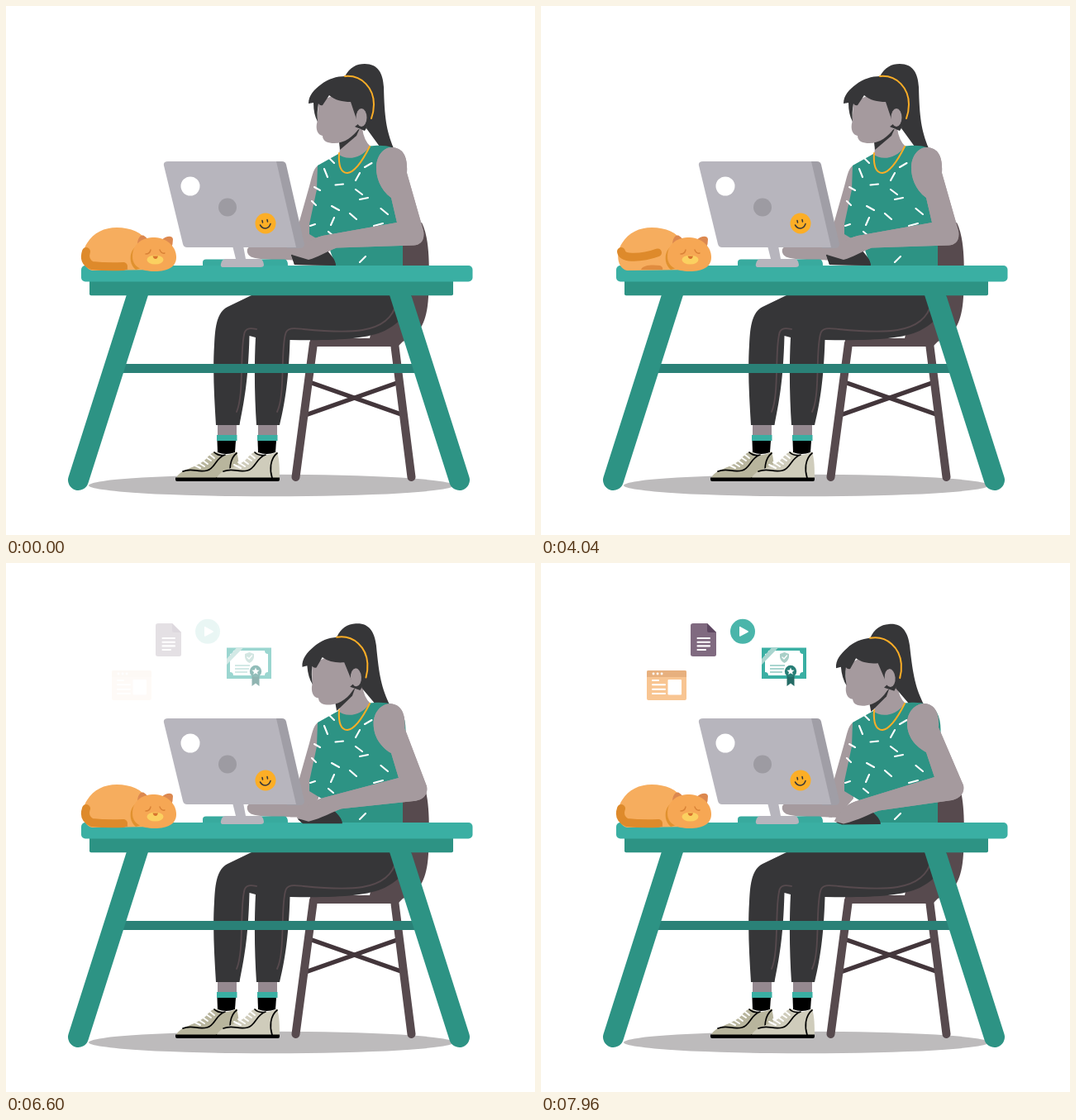
Write an HTML page that moves like this. It is 640 px wide and 640 px high and loops after 8000 ms.

```html
<!DOCTYPE html>
<html lang="en">
<head>
<meta charset="utf-8">
<title>Working at the desk</title>
<style>
  html, body { margin: 0; width: 100%; height: 100%; overflow: hidden; background: #fff; }
  svg { display: block; width: 100vw; height: 100vh; }
  .skin { fill: #a59a9e; }
  .dark { fill: #363638; }
  .teal { fill: #3aafa3; }
  .green { fill: #2d9384; }
  .chair { fill: #574a4e; }
  .line { fill: none; stroke-linecap: round; stroke-linejoin: round; }
  .white { stroke: #fff; stroke-width: 2.1; }
  .gold { stroke: #fcae26; stroke-width: 2; }
  .seam { stroke: #574a4e; stroke-width: 1.8; }
</style>
</head>
<body>
<svg viewBox="0 0 640 640">
  <defs>
    <g id="shoe">
      <path d="M255 571C260 560 279 559 290 549C297 541 301 537 306 541C313 545 322 543 328 539C331 550 331 560 331 571Z"/>
      <path d="M254 570.5H331V573Q331 575 329 575H256Q254 575 254 573Z" fill="#000"/>
      <path class="line" stroke="#000" stroke-width="1.7" d="M263 563C275 558 280 565 292 562C302 560 302 547 314 543M301 540Q306 545 314 543M328 541C319 548 319 562 322 571"/>
      <path class="line" stroke="#fff" stroke-width="2" d="M276 555L284 559M281 552L289 557M286 549L293 554M291 546L297 550M296 543L301 547"/>
    </g>
    <g id="ankle">
      <path fill="#958990" d="M305 506H328V521H305Z"/>
      <path class="teal" d="M304 519H328.500V526H304Z"/>
      <path d="M304.500 526H327L326 540Q315 544 305 540Z"/>
    </g>
  </defs>

  <ellipse cx="321" cy="580" rx="221" ry="13.300" fill="#bdbbbc"/>

  <!-- chair -->
  <path class="line" stroke="#43363b" stroke-width="5.500" d="M370 456L478 494M365 494L473 456"/>
  <path class="line" stroke="#574a4e" stroke-width="10" d="M372 408L350.500 570M470 408L490.500 570"/>
  <path class="chair" d="M470 262H503C512 280 513 312 511 352C509 386 499 399 480 406L474 412H368V402H440Z"/>

  <!-- legs -->
  <use href="#ankle" x="-49"/>
  <use href="#ankle"/>
  <use href="#shoe" x="-49" fill="#b8b59d"/>
  <use href="#shoe" fill="#cfccbb"/>
  <path class="dark" d="M310 345L297 350L268 364C255 371 253 388 252 410C250 440 252 475 254 507H282.500C288 478 293 455 294.500 399L302 401C300 440 301 475 303 507H331C338 478 342 450 343.500 404C400 405 436 403 458 393C478 383 488 370 492 345Z"/>
  <path class="line seam" d="M279 491C288 470 283 420 288 398C289 388 298 390 303 391M328 491C338 470 332 420 338 397C340 388 350 390 360 391C410 396 463 399 472 360"/>

  <!-- far arm and neck -->
  <path class="skin" d="M380 192C372 194 371 204 367 218L354 264L350 291H296C290 292 290 301 298 304C310 308 340 307 358 308L378 285Z"/>
  <path class="skin" d="M406 155L403 180L413 190L432 184L441 170Q433 163 431 148Z"/>

  <g id="head">
    <path class="dark" d="M410 85C416 74 424 70 434 70C450 70 456 81 457 98C458 135 460 150 469 172L452 170L436 148L441 120Z"/>
    <path class="dark" d="M403 165L428 148L424 157L404 174Z"/>
    <path class="skin" d="M378 116L376.500 140C374 149 377 156 383 157C383 164 390 166 397 166C410 166 420 158 427 148L431 120L410 102Z"/>
    <path class="dark" d="M366 118C366 108 373 101 381 95C390 88 400 85 410 85C431 84 445 100 445 120C445 130 441 140 434 151L422 146L427 142L424 137L417 116C407 116 398 114 391 108L383 120Q380 121 378 118Q376 128 377 140Q372 131 372 117Z"/>
    <ellipse class="skin" cx="430" cy="135" rx="6.500" ry="11"/>
    <path class="line gold" d="M410 85C431 83 445 100 445 119Q445 128 442 136"/>
  </g>

  <!-- torso -->
  <path class="green" d="M377 193L402 179C410 187 430 186 440 169.500C452 168 460 169 467 171C482 175 488 196 480 228V318H400L390 290L367 276V264L376 222Z"/>
  <path class="line white" d="M391 184L397 190M385 197L389 207M398.500 216.500L408 215.500M423 211L428 202M434 195L442.500 190M373 219L380 223M423 222L431 228M428 234L438 232M370 236L375 241M394 242L403 247M393 265L397 256M416 251L424 258M453.500 245L462 252M445 266L456 263M368 266L374 264M390 273L396 278M428 310L435 303"/>
  <path class="line gold" d="M403 178C402 193 405 202 413 202C423 201 433 184 440 170"/>

  <path class="dark" id="mouse"/>
  <path class="skin" id="arm"/>

  <!-- desk -->
  <path fill="#2a8177" d="M140 433H498V444H140Z"/>
  <path class="line" stroke="#2d9384" stroke-width="25" d="M162 340L87.500 573.500M474 340L548.500 573.500"/>
  <rect class="green" x="101" y="328" width="440" height="22.300" rx="2"/>
  <rect class="teal" x="91" y="314" width="473.500" height="19.500" rx="5"/>
  <use href="#mouse"/>
  <use href="#arm"/>

  <!-- monitor -->
  <path fill="#38aa9e" d="M238 314V310Q238 306.500 242 306.500H337Q341 306.500 341 314Z"/>
  <path fill="#a09ea6" d="M320 188H334Q338 188 339 192L361 288Q361 293 355 293H340Z"/>
  <path fill="#b7b5bd" d="M274 290H287L290 306H307Q311 306 312 313Q312 316 308 316H263Q259 316 260 312Q261 306 266 306H278ZM196 188H327L351 292H219Q215 292 214 288L191 193Q190 188 196 188Z"/>
  <circle cx="268" cy="243.500" r="11" fill="#9d9ba2"/>
  <circle cx="223" cy="218" r="11.500" fill="#fff"/>
  <circle cx="314" cy="263" r="12.500" fill="#fcae26"/>
  <path class="line" stroke="#363638" stroke-width="1.500" d="M307.500 265C311 271 318 270 320 263.500M310 259.500L310.500 262M316 258.500L316.500 261"/>

  <!-- cat -->
  <path fill="#f6ad5e" d="M104 320C92 317 90 299 98 287C106 274 119 268 134 268C151 268 165 274 172 286L190 319Z"/>
  <path fill="#e08c3f" d="M121 319C123 313 135 313 144 314Q148 316 147 319Z"/>
  <path fill="#e0912f" d="M157 291C148 298 149 313 157 319L164 317V292Z"/>
  <path class="line" id="tail" stroke="#de8a2b" stroke-width="10"/>
  <path fill="#dc884f" d="M159 289C159 281 163 276 167 278Q172 281 173 286ZM188 283C194 278 201 277 202 282Q202 288 200 293Z"/>
  <path fill="#f6a754" d="M153 303C153 288 164 280 180 280C196 281 206 292 206 304C206 316 195 321 180 321C163 321 153 315 153 303Z"/>
  <ellipse cx="180.500" cy="307" rx="10" ry="5.500" fill="#fbd060"/>
  <path fill="#d8742f" d="M177.500 302.500H184Q183 306 181 306Q178.500 306 177.500 302.500Z"/>
  <path class="line" stroke="#d98236" stroke-width="1.400" d="M169 300Q174 300 175 295M186 295Q188 300 192 299"/>

  <!-- icons -->
  <g id="certificate">
    <path class="teal" d="M267 102.500H321V140H267Z"/>
    <path fill="#fff" d="M275 106H313Q313 110 317 110V132Q313 132 313 136H275Q275 132 271 132V110Q275 110 275 106Z"/>
    <path fill="#a9d5cf" d="M267 116V123L287 102.500H279Z"/>
    <path fill="#a9cfc7" d="M294.500 108L300 110V114Q299 119 294.500 121Q290 119 289 114V110Z"/>
    <path class="line" stroke="#fff" stroke-width="1.300" d="M292 114L294 116L297.500 112"/>
    <path stroke="#a9d5cf" stroke-width="1.800" d="M277 124H295M277 128H294M277 132H292"/>
    <path fill="#246b65" d="M297.500 135H306.500V149L302 145.500L297.500 149Z"/>
    <circle cx="302" cy="131" r="7.200" fill="#287e76"/>
    <path fill="#fff" d="M302 126.500L303.300 129.500L306.500 129.800L304 132L304.800 135L302 133.300L299.200 135L300 132L297.500 129.800L300.700 129.500Z"/>
  </g>
  <g id="paper">
    <path fill="#806a80" d="M184 73H201L212 84V110.500Q212 113 209.500 113H184Q181 113 181 110.500V75.500Q181 73 184 73Z"/>
    <path fill="#5d4660" d="M201 73L212 84H203Q201 84 201 82Z"/>
    <path class="line white" d="M189.500 91H204M189.500 95.700H204M189.500 100.400H204M189.500 105H199"/>
  </g>
  <g id="play">
    <circle class="teal" cx="244" cy="82.800" r="15"/>
    <path fill="#fff" d="M240 77.500Q240 76.500 241 77L250.500 82.200Q251.500 83 250.500 83.700L241 88.700Q240 89 240 88Z"/>
  </g>
  <g id="browser">
    <rect x="128" y="130" width="48" height="36" rx="2" fill="#f8c088"/>
    <path fill="#e5a972" d="M128 138V132Q128 130 130 130H174Q176 130 176 132V138Z"/>
    <path class="line" stroke="#fff" stroke-width="2.800" d="M136 134H136.100M141 134H141.100M146 134H146.100"/>
    <path class="line white" d="M135 142H142M135 147.300H150M135 152.700H150M135 158H150"/>
    <rect x="153.500" y="141" width="16.500" height="18.500" rx="1" fill="#fff"/>
  </g>
</svg>
<script>
const LOOP = 8000;
const el = id => document.getElementById(id);
const progress = (t, from, to) => Math.min(1, Math.max(0, (t - from) / (to - from)));

// Blends two paths that share the same commands.
function blend(a, b, k) {
  const goal = b.match(/[\d.]+/g);
  let i = 0;
  return a.replace(/[\d.]+/g, n => (+n + (goal[i++] - n) * k).toFixed(2));
}

const tail = [
  'M97 297Q93 309 104 314Q122 316 142 315',
  'M97 297Q98 303 110 303.5Q125 304 141 298'
];
const arm = [
  'M467 171C482 172 486 184 485 202L505 272C507 284 501 289 493 289.500L400 292.500C388 297 378 304 366 307L346 301C355 290 370 281 383 278L473 262L466 232C452 222 448 206 448 196C448 182 456 171 467 171Z',
  'M464 170C478 171 482 184 481 199L511 269C513 280 505 285 497 287L409 299.500C398 303 385 311 366 315.500L355 312.500C360 300 372 290 385 287L476 259L466 229C448 219 443 205 443 194C443 181 452 170 464 170Z'
];
const mouse = [
  'M345 301L349 313L399 314C398 305 392 301 388 295Z',
  'M357 314L364 316.500L411 316C410 308 403 304 398 298Z'
];
const fades = {
  certificate: [6040, 7160],
  paper: [6420, 7300],
  play: [6420, 8100],
  browser: [6500, 8100]
};

function draw(t) {
  const lift = (1 - Math.cos(2 * Math.PI * progress(t, 1800, 5880))) / 2;
  const reach = Math.sin(progress(t, 5400, 8000) * Math.PI / 2);
  const nod = progress(t, 4740, 6980);

  el('tail').setAttribute('d', blend(...tail, lift));
  el('arm').setAttribute('d', blend(...arm, reach));
  el('mouse').setAttribute('d', blend(...mouse, reach));
  el('head').setAttribute('transform', `rotate(${-4.6 * nod} 477 235)`);
  for (const id in fades) el(id).setAttribute('opacity', progress(t, ...fades[id]));
}

function tick() {
  draw(performance.now() % LOOP);
  requestAnimationFrame(tick);
}
tick();
</script>
</body>
</html>
```
